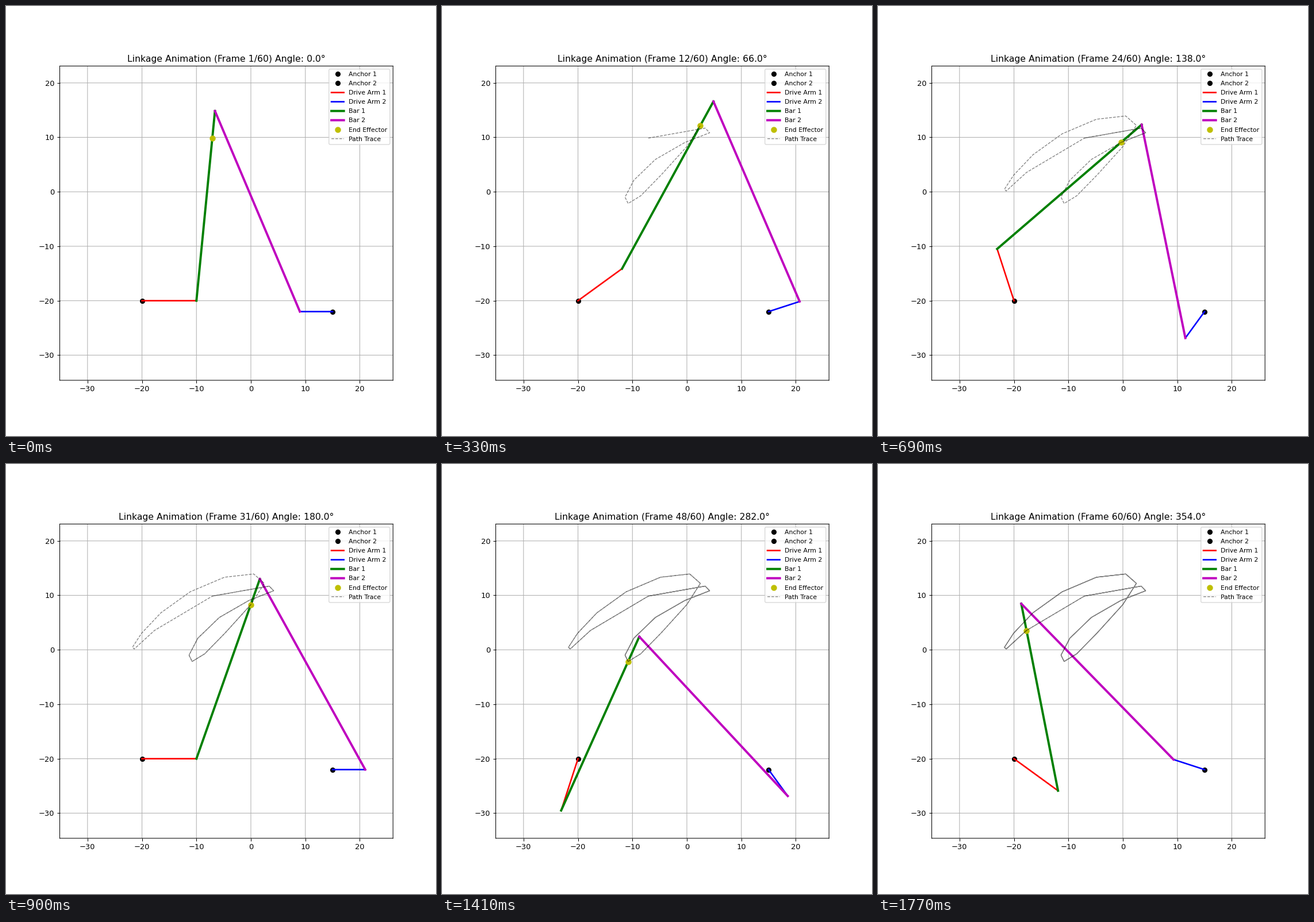
A matplotlib script for the animation above (1800 ms loop, 748 by 748 pixels).

```python
import numpy as np
import matplotlib.pyplot as plt
from matplotlib.animation import FuncAnimation

plt.rcParams["path.snap"] = False

FRAMES = 60
STEP = 360 / FRAMES
A1, A2 = np.array([-20.0, -20.0]), np.array([15.0, -22.0])
ARM1, ARM2 = 10, 6
BAR1, BAR2 = 35, 40
REACH = 30  # end effector distance along bar 1


def crank(anchor, radius, degrees):
    t = np.radians(degrees)
    return anchor + radius * np.array([np.cos(t), np.sin(t)])


def solve(angle):
    """Return both crank tips, the upper bar joint and the end effector."""
    p1 = crank(A1, ARM1, 6 * angle)
    p2 = crank(A2, ARM2, 180 + 3 * angle)
    dist = np.hypot(*(p2 - p1))
    u = (p2 - p1) / dist
    along = (BAR1**2 - BAR2**2 + dist**2) / (2 * dist)
    height = np.sqrt(BAR1**2 - along**2)
    joint = p1 + along * u + height * np.array([-u[1], u[0]])
    return p1, p2, joint, p1 + (joint - p1) * REACH / BAR1


poses = np.array([solve(i * STEP) for i in range(FRAMES)])
points = np.vstack([poses.reshape(-1, 2), A1, A2])
low, high = points.min(axis=0), points.max(axis=0)
pad = 0.1 * (high - low).max()

fig, ax = plt.subplots(figsize=(8, 8), dpi=93.5)
ax.set_aspect("equal")
ax.set_xlim(low[0] - pad, high[0] + pad)
ax.set_ylim(low[1] - pad, high[1] + pad)
ax.grid(True)

ax.plot(*A1, "ko", markersize=6, label="Anchor 1")
ax.plot(*A2, "ko", markersize=6, label="Anchor 2")
arm1, = ax.plot([], [], "r-", lw=2, label="Drive Arm 1")
arm2, = ax.plot([], [], "b-", lw=2, label="Drive Arm 2")
bar1, = ax.plot([], [], "g-", lw=3, label="Bar 1")
bar2, = ax.plot([], [], "m-", lw=3, label="Bar 2")
tip, = ax.plot([], [], "yo", markersize=7, label="End Effector")
trace, = ax.plot([], [], "k--", lw=1, alpha=0.5, label="Path Trace")
ax.legend(loc="upper right", fontsize="small", labelspacing=0.56)
title = ax.set_title("")


def link(line, *ends):
    line.set_data(*np.transpose(ends))


def update(i):
    p1, p2, joint, effector = poses[i]
    link(arm1, A1, p1)
    link(arm2, A2, p2)
    link(bar1, p1, joint)
    link(bar2, p2, joint)
    link(tip, effector)
    link(trace, *poses[:i + 1, 3])
    title.set_text(f"Linkage Animation (Frame {i + 1}/{FRAMES}) "
                   f"Angle: {i * STEP:.1f}°")
    return arm1, arm2, bar1, bar2, tip, trace, title


anim = FuncAnimation(fig, update, frames=FRAMES, interval=30,
                     repeat=True, repeat_delay=0, blit=False)
plt.show()
```
